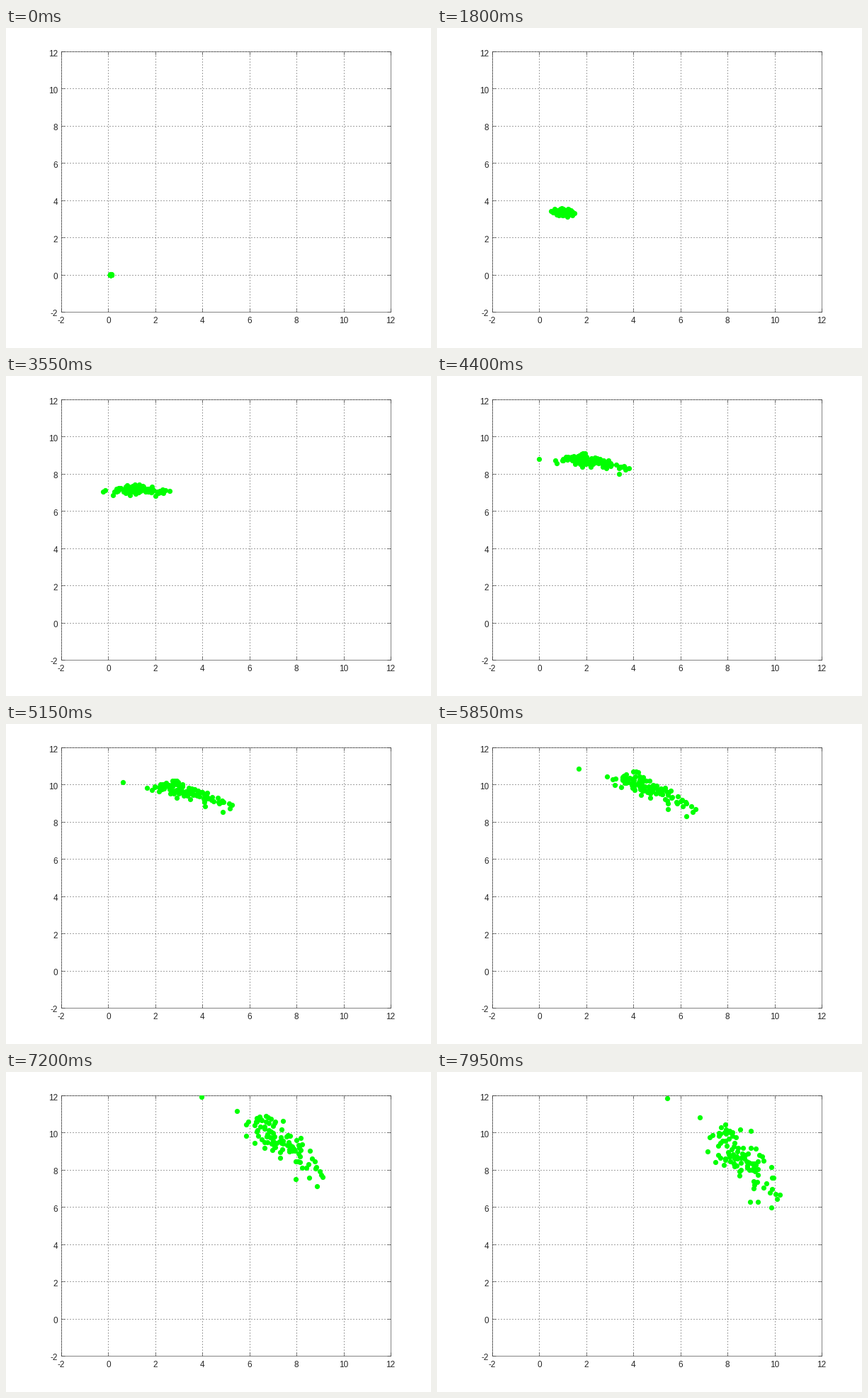
Write a matplotlib script that moves like this. It is 600 by 451 pixels and loops after 8000 ms.

```python
import numpy as np
import matplotlib.pyplot as plt
from matplotlib.animation import FuncAnimation
from matplotlib.transforms import ScaledTranslation

W, H, DPI = 600, 451, 64
PX = 72 / DPI          # points per pixel
FRAMES, STEP_MS = 160, 50
COUNT = 100
TURN_SD, SLIP_SD = 0.0145, 0.015
LEFT, RIGHT, TOP, BOTTOM = 78, 543, 33, 400

# Way points of the cloud centre (x + yj) and the frames they are reached.
WAY_FRAMES = np.array([0, 6, 17, 36, 71, 103, 129, 144, 159])
WAY_POINTS = np.array([0.1, 0.6 + 0.33j, 0.96 + 1.42j, 1.05 + 3.36j,
                       1.18 + 7.14j, 3.3 + 9.6j, 5.83 + 9.72j,
                       7.3 + 9.52j, 8.55 + 8.65j])


def smooth_path(times, points, t):
    """Cubic curve through the points, evaluated at every t."""
    slopes = np.gradient(points, times)
    i = np.clip(np.searchsorted(times, t, side="right") - 1, 0, len(times) - 2)
    span = times[i + 1] - times[i]
    u = (t - times[i]) / span
    return ((1 + 2 * u) * (1 - u) ** 2 * points[i]
            + u * (1 - u) ** 2 * span * slopes[i]
            + u * u * (3 - 2 * u) * points[i + 1]
            + u * u * (u - 1) * span * slopes[i + 1])


def simulate(path, seed):
    """Particles that repeat the moves with drifting heading and noisy speed."""
    rng = np.random.default_rng(seed)
    moves = np.diff(path, prepend=0)[:, None]
    drift = rng.normal(0, TURN_SD, (FRAMES, COUNT)).cumsum(axis=0)
    slip = rng.normal(0, SLIP_SD, (FRAMES, COUNT))
    steps = (np.abs(moves) + slip) * np.exp(1j * (np.angle(moves) + drift))
    cloud = steps.cumsum(axis=0)
    return cloud + (path - cloud.mean(axis=1))[:, None]


cloud = simulate(smooth_path(WAY_FRAMES, WAY_POINTS, np.arange(FRAMES)), seed=5)

plt.rcParams.update({"font.family": "Liberation Sans",
                     "axes.unicode_minus": False})
fig = plt.figure(figsize=(W / DPI, H / DPI), dpi=DPI, facecolor="white")
ax = fig.add_axes([LEFT / W, 1 - BOTTOM / H,
                   (RIGHT - LEFT) / W, (BOTTOM - TOP) / H])
ticks = np.arange(-2, 13, 2)
ax.set(xlim=(-2, 12), ylim=(-2, 12), xticks=ticks, yticks=ticks)
ax.set_axisbelow(True)
ax.grid(color="#444444", linewidth=PX, linestyle=(0, (1, 3)))
ax.tick_params(direction="in", top=True, right=True, length=5 * PX,
               width=0.6 * PX, color="#333333", labelcolor="#262626",
               labelsize=11.7 * PX)
ax.tick_params(axis="x", pad=7.5 * PX)
ax.tick_params(axis="y", pad=5 * PX)
for side in ax.spines.values():
    side.set(linewidth=0.6 * PX, color="#333333")
drop = ScaledTranslation(0, -2 / DPI, fig.dpi_scale_trans)
for label in ax.get_yticklabels():
    label.set_transform(label.get_transform() + drop)

dots, = ax.plot([], [], "o", color="#00ff00", markersize=7.2 * PX,
                markeredgewidth=0, zorder=3)


def update(frame):
    dots.set_data(cloud[frame].real, cloud[frame].imag)
    return dots,


anim = FuncAnimation(fig, update, frames=FRAMES, interval=STEP_MS,
                     repeat=True, repeat_delay=0)
plt.show()
```
